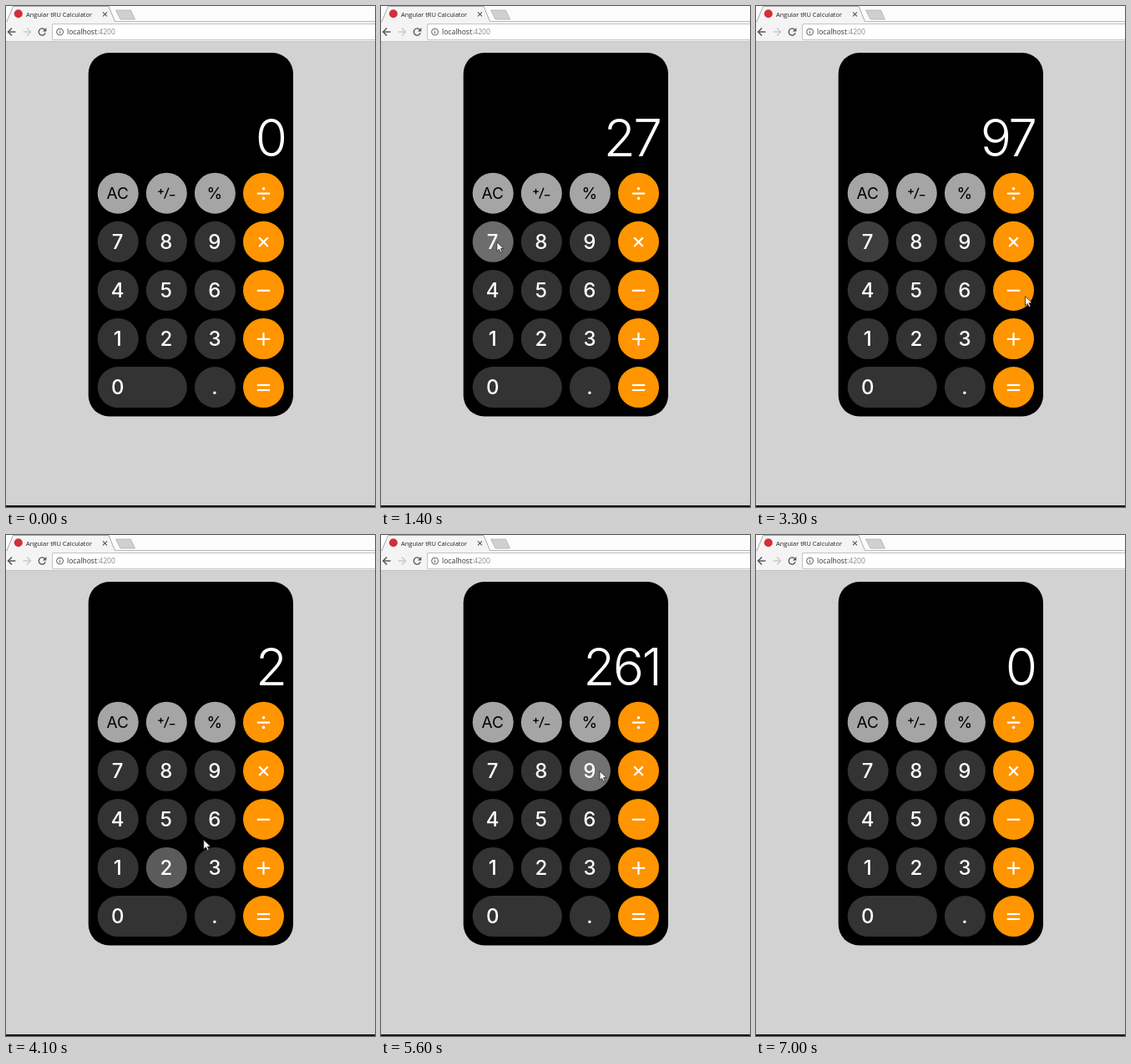
An HTML page with a canvas for the animation above (7100 ms loop, 442x600 px).

```html
<!DOCTYPE html>
<html lang="en">
<head>
<meta charset="utf-8">
<title>Calculator</title>
<style>
  html, body { margin: 0; width: 100%; height: 100%; overflow: hidden; background: #d2d2d2; }
  canvas { display: block; width: 442px; height: 600px; }
</style>
</head>
<body>
<canvas id="stage" width="442" height="600"></canvas>
<script>
const ctx = document.getElementById('stage').getContext('2d');
const LOOP = 7100, STEP = 100, HOLD = 100, FADE = 550;
const RADIUS = 24.5, PITCH = 58.1;
const KEYS = ['AC', '±', '%', '÷', ...'789×456−123+', '0', '', '.', '='];
const OPS = {
  '÷': (a, b) => a / b,
  '×': (a, b) => a * b,
  '−': (a, b) => a - b,
  '+': (a, b) => a + b
};

// The sum being typed and when each key is released.
const TYPED = [...'27×97−2619='];
const TIMES = [800, 1350, 1900, 2350, 2850, 3450, 3900, 4350, 4950, 5650, 6250];

function place(i) {
  return { x: 134.2 + PITCH * (i % 4), y: 224.2 + PITCH * Math.floor(i / 4) };
}

// Works the calculator and returns the display after each key.
function calculate(keys) {
  let shown = '0', stored = 0, op = null, fresh = true;
  return keys.map(key => {
    if (key >= '0' && key <= '9') {
      shown = fresh ? key : shown + key;
      fresh = false;
    } else {
      stored = op ? OPS[op](stored, +shown) : +shown;
      shown = String(stored);
      op = key === '=' ? null : key;
      fresh = true;
    }
    return shown;
  });
}

// The pointer enters, visits each key with a slight overshoot, and leaves.
function planMoves() {
  let from = { x: 300, y: 612 }, key = from, begin = 100;
  const moves = TYPED.map((name, i) => {
    const next = place(KEYS.indexOf(name));
    const to = {
      x: next.x + 7 + (next.x - key.x) * 0.04,
      y: next.y + 5 + (next.y - key.y) * 0.04
    };
    const move = { from, to, begin, end: TIMES[i] - 150 };
    from = to;
    key = next;
    begin = TIMES[i] + 50;
    return move;
  });
  return [...moves, { from, to: { x: 412, y: 572 }, begin, end: begin + 450 }];
}

const SHOWN = calculate(TYPED);
const MOVES = planMoves();

function line(color, width, ...pts) {
  ctx.strokeStyle = color;
  ctx.lineWidth = width;
  ctx.beginPath();
  pts.forEach(([x, y]) => ctx.lineTo(x, y));
  ctx.stroke();
}

function poly(color, ...pts) {
  ctx.fillStyle = color;
  ctx.beginPath();
  pts.forEach(([x, y]) => ctx.lineTo(x, y));
  ctx.closePath();
  ctx.fill();
}

function rect(color, x, y, w, h) {
  ctx.fillStyle = color;
  ctx.fillRect(x, y, w, h);
}

function pill(color, x, y, w, h, r) {
  ctx.fillStyle = color;
  ctx.beginPath();
  ctx.roundRect(x, y, w, h, r);
  ctx.fill();
}

function dot(color, x, y, r) {
  pill(color, x - r, y - r, r * 2, r * 2, r);
}

function ring(color, width, x, y, r, from = 0, to = Math.PI * 2) {
  ctx.strokeStyle = color;
  ctx.lineWidth = width;
  ctx.beginPath();
  ctx.arc(x, y, r, from, to);
  ctx.stroke();
}

function text(str, x, y, font, color, align = 'left') {
  ctx.font = font;
  ctx.fillStyle = color;
  ctx.textAlign = align;
  ctx.fillText(str, x, y);
  return ctx.measureText(str).width;
}

function mix(a, b, k) {
  return `rgb(${a.map((v, i) => Math.round(v + (b[i] - v) * k)).join(',')})`;
}

function cross(color, width, x, y, r) {
  line(color, width, [x - r, y - r], [x + r, y + r]);
  line(color, width, [x + r, y - r], [x - r, y + r]);
}

function plus(color, width, x, y, r) {
  line(color, width, [x - r, y], [x + r, y]);
  line(color, width, [x, y - r], [x, y + r]);
}

// An arrow with its tip at x, pointing left (dir 1) or right (dir -1).
function navArrow(color, x, dir) {
  line(color, 1.4, [x, 31], [x + 9 * dir, 31]);
  line(color, 1.4, [x + 4.5 * dir, 26.5], [x, 31], [x + 4.5 * dir, 35.5]);
}

function drawBrowser() {
  rect('#fcfcfc', 0, 0, 442, 18);
  rect('#f4f4f4', 0, 18, 442, 24);
  line('#b9b9b9', 1, [0, 18.5], [442, 18.5]);
  poly('#f4f4f4', [1, 20], [9, 0], [123, 0], [131, 20]);
  line('#a8a8a8', 1, [1, 18.5], [8.5, 0.5], [123, 0.5], [130.5, 18.5]);
  const tab = [[131.5, 5], [149.5, 5], [154.5, 16], [137, 16]];
  poly('#d0d0d0', ...tab);
  line('#b0b0b0', 0.8, ...tab, tab[0]);

  dot('#d32f3a', 14.8, 9.3, 5);
  text('Angular tRU Calculator', 24, 12.5, '7.5px "Open Sans", sans-serif', '#222');
  cross('#555', 1.1, 118.5, 9.8, 2.5);

  navArrow('#505050', 2.5, 1);
  navArrow('#c8c8c8', 29.5, -1);
  ring('#555', 1.4, 43.3, 31, 4, 0.3, 5.5);
  poly('#555', [48.3, 26], [48.3, 30.4], [44, 30.4]);

  pill('#c4c4c4', 55, 21, 400, 20, 2);
  pill('#fff', 56, 22, 400, 18, 1.5);
  ring('#606060', 1, 64.6, 31, 4);
  rect('#606060', 64.1, 30.2, 1, 3);
  rect('#606060', 64.1, 28.3, 1, 1);
  const font = '8.6px "Open Sans", sans-serif';
  const w = text('localhost', 73, 34, font, '#333');
  text(':4200', 73 + w, 34, font, '#888');
  line('#c4c4c4', 1, [0, 42.5], [442, 42.5]);
}

function drawSign(key, x, y) {
  const bar = dy => line('#fff', 2.2, [x - 7.7, y + dy], [x + 7.7, y + dy]);
  if (key === '×') cross('#fff', 2.2, x, y, 5.3);
  if (key === '+') plus('#fff', 2.2, x, y, 7.7);
  if (key === '=') [-3, 3].forEach(bar);
  if (key === '−' || key === '÷') bar(0);
  if (key === '÷') [-5.8, 5.8].forEach(dy => dot('#fff', x, y + dy, 1.8));
}

function drawPlusMinus(x, y) {
  plus('#000', 1.4, x - 6.8, y - 2, 3.2);
  line('#000', 1.4, [x - 2.6, y + 6.5], [x + 2.6, y - 6.5]);
  line('#000', 1.4, [x + 3.6, y + 2.5], [x + 10, y + 2.5]);
}

function glow(key, t) {
  const last = TYPED.findLastIndex((name, i) => name === key && t >= TIMES[i] - HOLD);
  return last < 0 ? 0 : Math.max(0, Math.min(1, 1 - (t - TIMES[last]) / FADE));
}

function drawKey(key, i, t) {
  const { x, y } = place(i);
  const top = i < 4, side = i % 4 === 3, k = glow(key, t);
  const color = side ? mix([255, 149, 0], [251, 199, 141], k)
    : top ? '#a5a5a5'
    : mix([51, 51, 51], [114, 114, 114], k);
  const width = RADIUS * 2 + (key === '0' ? PITCH : 0);
  pill(color, x - RADIUS, y - RADIUS, width, RADIUS * 2, RADIUS);

  if (side) drawSign(key, x, y + 0.4);
  else if (key === '±') drawPlusMinus(x, y);
  else if (top) text(key, x - 0.5, y + 7, '19px Inter, sans-serif', '#000', 'center');
  else text(key, x - 0.5, y + 8.7, '450 24px Inter, sans-serif', '#fff', 'center');
}

function drawDisplay(t) {
  const last = TIMES.findLastIndex(time => time <= t);
  ctx.letterSpacing = '-2.5px';
  text(SHOWN[last] || '0', 334.5, 180, '350 62px Inter, sans-serif', '#fff', 'right');
  ctx.letterSpacing = '0px';
}

function drawPointer(t) {
  const move = MOVES.findLast(m => m.begin <= t);
  if (!move || t >= MOVES.at(-1).end) return;
  const { from, to, begin, end } = move;
  const u = Math.min(1, (t - begin) / (end - begin)), e = u * u * (3 - 2 * u);
  ctx.save();
  ctx.translate(from.x + (to.x - from.x) * e, from.y + (to.y - from.y) * e);
  const arrow = [[0, 0], [0, 11], [2.6, 8.7], [4.5, 12.7], [6.3, 11.9], [4.5, 8], [8, 7.8]];
  poly('#fff', ...arrow);
  line('#222', 0.8, ...arrow, arrow[0]);
  ctx.restore();
}

function draw(t) {
  rect('#d2d2d2', 0, 0, 442, 600);
  drawBrowser();
  rect('#15161c', 0, 598, 442, 2);
  pill('#000', 98.7, 56, 245.3, 435.5, 25);
  drawDisplay(t);
  KEYS.forEach((key, i) => key && drawKey(key, i, t));
  drawPointer(t);
}

const start = performance.now();
function tick() {
  const t = (performance.now() - start) % LOOP;
  draw(Math.floor(t / STEP) * STEP);
  requestAnimationFrame(tick);
}
tick();
</script>
</body>
</html>
```
